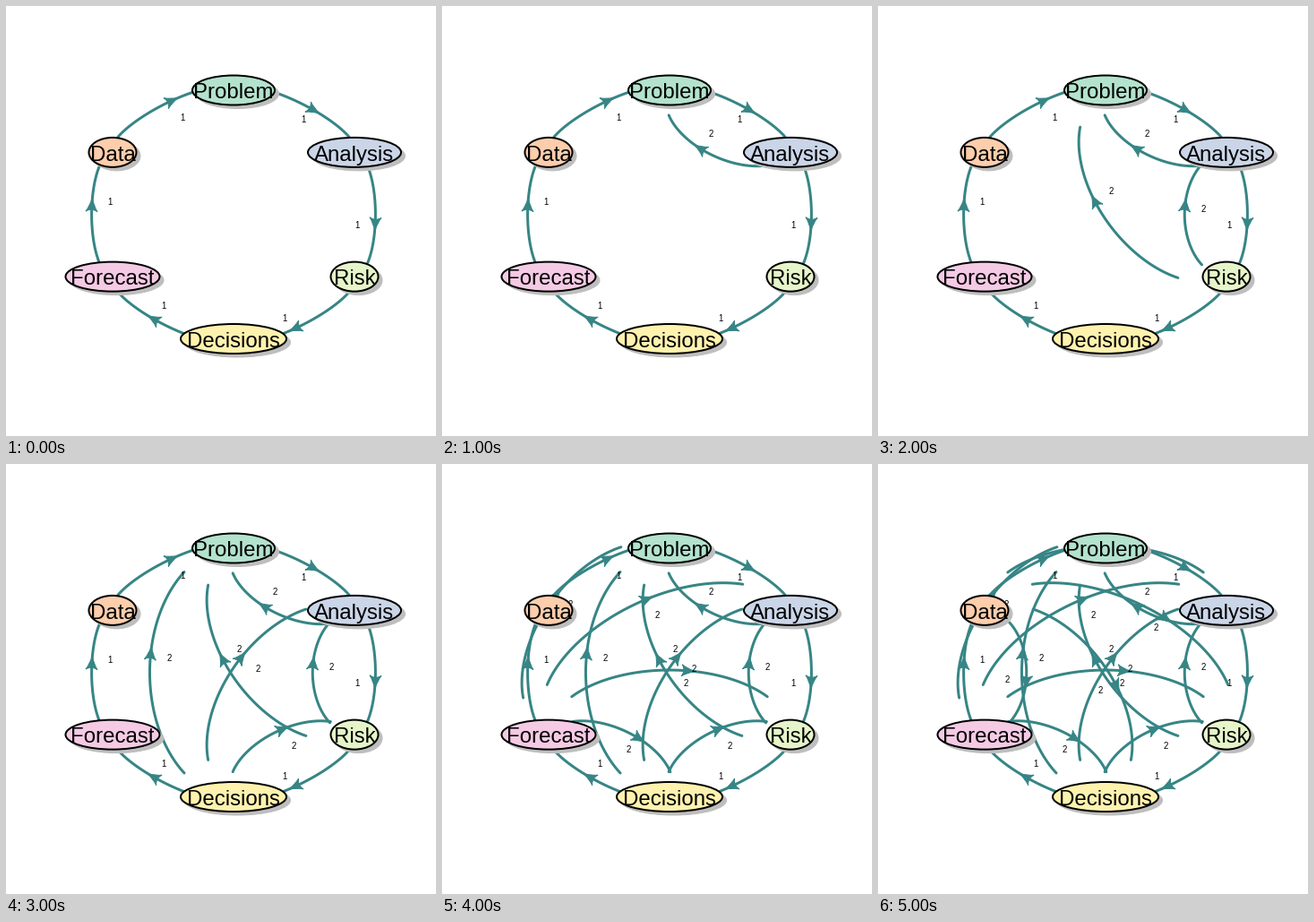
These frames come from a looping animation (480 px wide and 480 px high, 6000 ms). A matplotlib script:

```python
import numpy as np
import matplotlib.pyplot as plt
from matplotlib.animation import FuncAnimation
from matplotlib.patches import Ellipse, PathPatch
from matplotlib.path import Path

SIZE, DPI = 480, 100
PX = 72 / DPI                          # points per pixel
CENTER = np.array([254, 232.75])
SCALE = np.array([155.9, -138.75])     # ring radius on each axis, y upward
TEAL, SHADE = "#378585", "#bebebe"
FONT = "Liberation Sans"

# name, half width, fill; clockwise from the top
NODES = [
    ("Problem", 46, "#b3e2cd"),
    ("Analysis", 52, "#cbd5e8"),
    ("Risk", 26.5, "#e6f5c9"),
    ("Decisions", 59, "#fff2ae"),
    ("Forecast", 52.5, "#f4cae4"),
    ("Data", 26.5, "#fdcdac"),
]

# label centres of the ring edges, keyed by (start, end)
RING = {
    (0, 1): (332, 127), (1, 2): (392, 245), (2, 3): (311, 348),
    (3, 4): (176.5, 334), (4, 5): (116, 219), (5, 0): (197, 124),
}
# label centres of the feedback edges; each appears at step = start
BACK = {
    (1, 0): (300, 143),
    (2, 0): (260, 207), (2, 1): (363, 227),
    (3, 0): (182, 217), (3, 1): (281, 229), (3, 2): (321, 315),
    (4, 0): (143.5, 157), (4, 1): (240, 169), (4, 2): (272, 244),
    (4, 3): (208, 318),
    (5, 1): (272, 105), (5, 2): (310, 183), (5, 3): (248, 253),
    (5, 4): (144, 241),
}

fig = plt.figure(figsize=(SIZE / DPI, SIZE / DPI), dpi=DPI, facecolor="white")
ax = fig.add_axes([0, 0, 1, 1])
ax.set_xlim(0, SIZE)
ax.set_ylim(SIZE, 0)
ax.axis("off")


def ring_point(i):
    a = np.pi / 2 - i * np.pi / 3
    return np.array([np.cos(a), np.sin(a)])


def arc(start, end, bend, t):
    """Points on the half ellipse that bulges left of the chord."""
    a, b = ring_point(start), ring_point(end)
    chord = b - a
    left = np.array([-chord[1], chord[0]])
    t = np.pi * np.atleast_1d(t)[:, None]
    unit = (a + b) / 2 - np.cos(t) / 2 * chord + np.sin(t) * bend * left
    return CENTER + SCALE * unit


def arrow_head(pos, direction):
    d = direction / np.hypot(*direction)
    side = np.array([-d[1], d[0]])
    shape = [(7.5, 0), (-1, 2), (-7.5, 6.5), (-3, 0), (-7.5, -6.5),
             (-1, -2), (7.5, 0)]
    pts = [pos + x * d + y * side for x, y in shape]
    codes = [Path.MOVETO] + [Path.CURVE3] * 6
    return PathPatch(Path(pts, codes), fc=TEAL, ec=TEAL, lw=PX, zorder=2)


def write(x, y, text, size, z):
    return ax.text(x, y, text, fontsize=size * PX, family=FONT, color="black",
                   ha="center", va="baseline", zorder=z)


def add_edge(edge, bend, label, spot):
    line, = ax.plot(*arc(*edge, bend, np.linspace(0.2, 0.8, 80)).T, color=TEAL,
                    lw=3 * PX, solid_capstyle="round", zorder=1)
    before, pos, after = arc(*edge, bend, [0.549, 0.55, 0.551])
    head = ax.add_patch(arrow_head(pos, after - before))
    return [line, head, write(spot[0], spot[1] + 3.5, label, 9.6, 3)]


def add_node(i, name, half, fill):
    x, y = CENTER + SCALE * ring_point(i)
    size = 2 * half, 33
    ax.add_patch(Ellipse((x + 4.5, y + 4), *size, fc=SHADE, ec=SHADE,
                         lw=PX, zorder=4))
    ax.add_patch(Ellipse((x, y), *size, fc=fill, ec="black",
                         lw=2 * PX, zorder=5))
    write(x, y + 9.3, name, 24, 6)


for edge, spot in RING.items():
    add_edge(edge, 0.15, "1", spot)
feedback = [(edge[0], add_edge(edge, 0.3, "2", spot))
            for edge, spot in BACK.items()]
for i, node in enumerate(NODES):
    add_node(i, *node)


def update(step):
    shown = []
    for first, parts in feedback:
        for part in parts:
            part.set_visible(first <= step)
            shown.append(part)
    return shown


anim = FuncAnimation(fig, update, frames=len(NODES), interval=1000,
                     init_func=lambda: update(0), repeat=True, repeat_delay=0,
                     blit=False)
plt.show()
```
